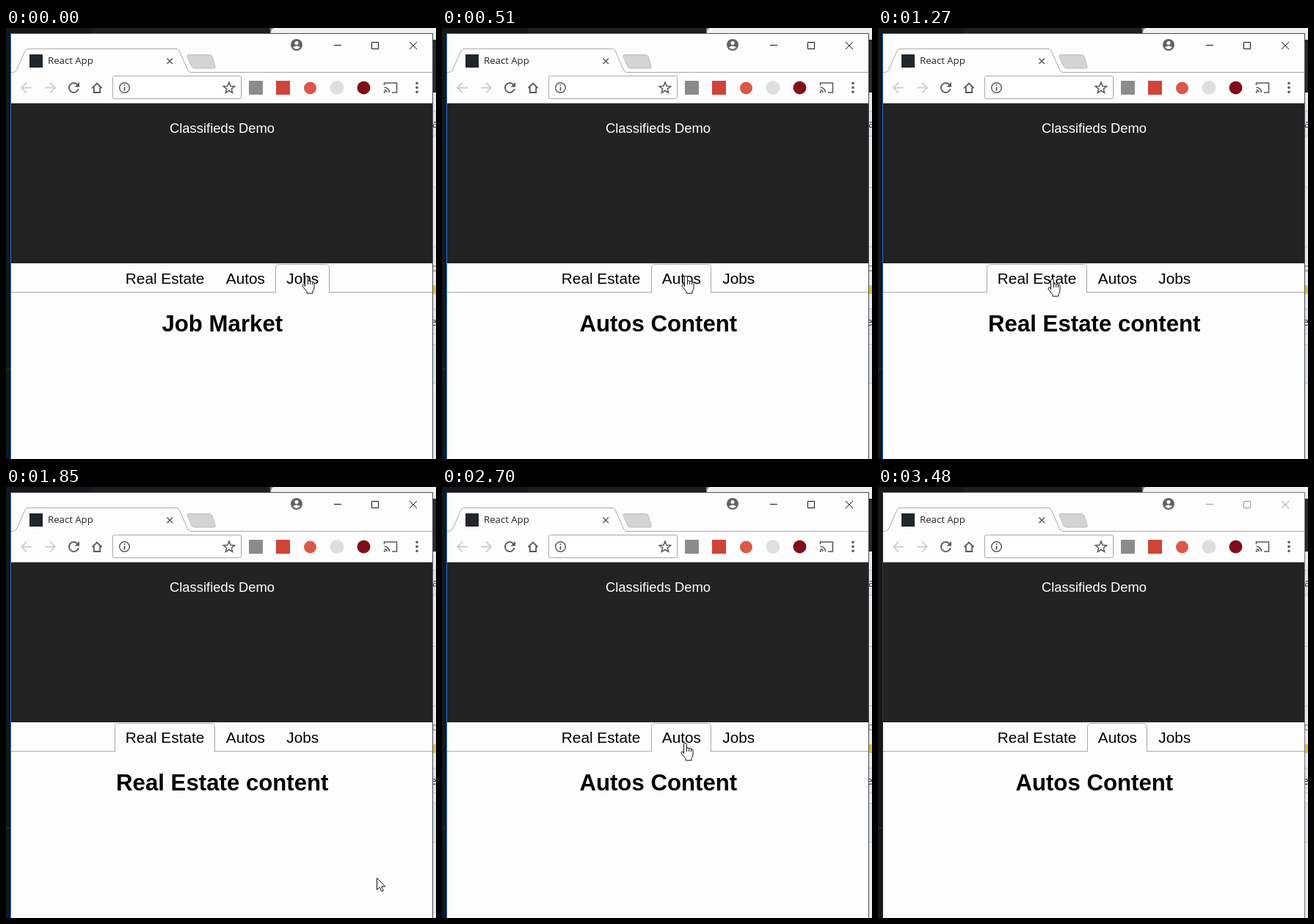
An HTML page for the animation above (3.5 s loop, 586x588 px).

```html
<!DOCTYPE html>
<html lang="en">
<head>
<meta charset="utf-8">
<title>Tabs demo</title>
<style>
  html, body { margin: 0; width: 100%; height: 100%; overflow: hidden; background: #fdfdfd; }
  svg { display: block; width: 586px; height: 588px; }
  .page { font-family: "Liberation Sans", Arial, sans-serif; }
  .chrome { font-family: "Open Sans", "Noto Sans", sans-serif; }
  .line { fill: none; stroke: #5a5a5a; stroke-width: 1.8; }
  .faint { stroke: #cecece; }
</style>
</head>
<body>
<svg viewBox="0 0 586 588">
  <!-- desktop behind the window -->
  <rect width="586" height="588" fill="#15171a"/>
  <rect x="117" width="250" height="8" fill="#1f1f1f"/>
  <path d="M360 8V0H586V8Z" fill="#f1f1f1"/>
  <path d="M360 0H365Q361 2 361 8H360Z" fill="#8a8a8a"/>
  <path d="M0 465.5H6" stroke="#30343a"/>
  <g>
    <rect x="581" y="8" width="5" height="580" fill="#e9e9e9"/>
    <rect x="581" y="16" width="5" height="72" fill="#292929"/>
    <rect x="581" y="114" width="5" height="33" fill="#dfe2ea"/>
    <rect x="581" y="351" width="5" height="12" fill="#e2c033"/>
    <rect x="581" y="384" width="5" height="33" fill="#dfe2ea"/>
    <rect x="581" y="431" width="5" height="53" fill="#d9e0e8"/>
    <path d="M581 113.5h5M581 147.5h5M581 217.5h5M581 298.5h5M581 383.5h5M581 417.5h5M581 431.5h5M581 484.5h5" stroke="#bcbcbc"/>
    <g class="chrome" font-size="14" fill="#333">
      <text x="581" y="136">a</text>
      <text x="580" y="332" fill="#b5513a">c</text>
      <text x="579" y="406">e</text>
    </g>
  </g>

  <!-- window -->
  <rect x="7" y="8" width="574" height="580" fill="#fdfdfd"/>
  <path id="edge" d="M6.5 588V8" stroke="#1670e0"/>
  <path id="rim" d="M6 7.5H582M581.5 8V588" fill="none" stroke="#4a5058"/>
  <path d="M7 60.5H10Q13 60 14.5 57L26 31Q27.500 28.500 30 28.500H232Q235 28.500 236 31L247.500 57Q249 60.500 252 60.500H581" fill="none" stroke="#a9a9a9"/>
  <path d="M249 36.500H277Q280 36.500 281 39L285 52Q286 55 283 55H257Q254 55 253 52.500L247 39Q246.500 36.500 249 36.500Z" fill="#d4d4d4" stroke="#bdbdbd"/>
  <rect x="32" y="36" width="18" height="18" fill="#20262b"/>
  <g class="chrome">
    <text x="57" y="49.300" font-size="13.200" fill="#222">React App</text>
    <text x="176" y="87" font-size="15.100" fill="#222">localhost<tspan fill="#7c7c7c">:3000</tspan></text>
  </g>
  <path d="M219.500 41.500l7.500 7.500m0-7.500l-7.500 7.500" class="line" style="stroke-width:1.500"/>
  <circle cx="396" cy="23" r="8" fill="#636363"/>
  <circle cx="396" cy="20.500" r="2.500" fill="#fff"/>
  <path d="M391 26.500Q396 22.500 401 26.500Q396 31 391 26.500Z" fill="#fff"/>
  <path id="controls" d="M447 23.500H457M498.500 19.500H507.500V28.500H498.500ZM550 19L560 29M560 19L550 29" fill="none" stroke="#111"/>

  <!-- toolbar -->
  <path d="M35 81.500H21M28 74.500L21 81.500L28 88.500M53 81.500H67M60 74.500L67 81.500L60 88.500" class="line faint"/>
  <path d="M97.500 77.500A6.500 6.500 0 1 0 98.700 83" class="line"/>
  <path d="M100 74V80.500H93.500Z" fill="#5a5a5a"/>
  <path d="M117.500 82L124 75.500L130.500 82M119.800 80.500V88H128.200V80.500" class="line"/>
  <rect x="145.500" y="65.500" width="175" height="31" rx="2" fill="#fff" stroke="#a8a8a8"/>
  <circle cx="161.500" cy="81.500" r="6.800" class="line" style="stroke-width:1.500"/>
  <path d="M161.500 77.300V79M161.500 80.500V85.500" class="line"/>
  <path id="star" class="line" style="stroke-width:1.500"/>
  <rect x="331" y="72" width="19" height="19" rx="1" fill="#8b8b8b"/>
  <rect x="368" y="72" width="19" height="19" fill="#cf4439"/>
  <circle cx="414.500" cy="82" r="8.500" fill="#d9584a"/>
  <circle cx="451" cy="81.500" r="9.500" fill="#dedede"/>
  <circle cx="487.500" cy="81.500" r="9" fill="#800f19"/>
  <path d="M515.500 78V75H532.500V88H526M515.500 81Q522 81.500 522.500 88M515.500 84.500Q519 85 519 88" class="line" style="stroke-width:1.600"/>
  <g fill="#5a5a5a">
    <circle cx="515.900" cy="87.500" r="1.200"/>
    <circle cx="560" cy="75.300" r="1.800"/><circle cx="560" cy="81.300" r="1.800"/><circle cx="560" cy="87.300" r="1.800"/>
  </g>
  <path d="M7 102.500H581" stroke="#b5b5b5"/>

  <!-- page -->
  <rect x="7" y="103" width="574" height="218" fill="#222"/>
  <g class="page">
    <text x="294.500" y="143" font-size="18.400" fill="#fff" text-anchor="middle">Classifieds Demo</text>
    <path d="M7 360.500H581" stroke="#aaa"/>
    <path id="tab" fill="#fdfdfd" stroke="#aaa"/>
    <g font-size="20.800" fill="#000">
      <text x="162.800" y="349">Real Estate</text>
      <text x="299.800" y="349">Autos</text>
      <text x="382.300" y="349">Jobs</text>
    </g>
    <text id="heading" x="294.800" y="414" font-size="31.200" font-weight="bold" text-anchor="middle"></text>
  </g>

  <g id="cursor" fill="#fff" stroke="#111" stroke-linejoin="round">
    <g id="hand" transform="translate(-6 0)">
      <path d="M4.500 15V2.500a2 2 0 0 1 4 0V8q0-1.300 1.600-1.300q1.700 0 1.700 1.800q.2-1.200 1.600-1q1.300.2 1.300 1.700q.4-.9 1.300-.6q1 .3 1 1.800V16q0 3-2 5V24H7V21.500L2 15.500Q.4 13.300 1.600 12.200q1.300-1 2.900 1.300Z"/>
      <path d="M8.500 8V12M11.700 8.500V12M14.600 9V12" fill="none"/>
    </g>
    <path id="arrow" d="M.5.500V16.500L4.200 13L6.800 18.800L9.200 17.700L6.700 12H11.700Z"/>
  </g>
</svg>
<script>
const LOOP = 3500;
const $ = id => document.getElementById(id);
const el = {};
for (const id of ["tab", "heading", "cursor", "hand", "arrow", "edge", "rim", "controls"]) el[id] = $(id);

const tabs = {
  estate: { left: 148.5, right: 284.5, title: "Real Estate content" },
  autos: { left: 285.5, right: 366.5, title: "Autos Content" },
  jobs: { left: 367.5, right: 440.5, title: "Job Market" }
};
const clicks = [[0, "jobs"], [510, "autos"], [1270, "estate"], [2700, "autos"]];

const linear = p => p;
const easeOut = p => 1 - (1 - p) ** 2;
const easeInOut = p => p < 0.5 ? 4 * p ** 3 : 1 - 4 * (1 - p) ** 3;

// Pointer moves: start, end, target x, target y, easing
const startPos = [409, 338];
const moves = [
  [40, 320, 332, 338, easeInOut],
  [510, 930, 237, 342, easeInOut],
  [1440, 1920, 508, 535, easeInOut],
  [2000, 2490, 331, 348.5, easeOut],
  [2700, 3000, 471, 521.5, linear],
  [3000, 3200, 543, 592, linear]
];

function pointerAt(t) {
  let [x, y] = startPos;
  for (const [from, to, tx, ty, ease] of moves) {
    if (t < from) break;
    const p = ease(Math.min(1, (t - from) / (to - from)));
    x += (tx - x) * p;
    y += (ty - y) * p;
  }
  return [Math.round(x), Math.round(y)];
}

function starPath(cx, cy, outer, inner) {
  const points = Array.from({ length: 10 }, (_, i) => {
    const r = i % 2 ? inner : outer, a = Math.PI * (i / 5 - 0.5);
    return `${cx + r * Math.cos(a)} ${cy + r * Math.sin(a)}`;
  });
  return `M${points.join("L")}Z`;
}

function draw(t) {
  const name = clicks.filter(([at]) => at <= t).pop()[1];
  const { left, right, title } = tabs[name];
  el.tab.setAttribute("d", `M${left} 361.5V327.500q0-5 5-5H${right - 5}q5 0 5 5V361.500`);
  el.heading.textContent = title;

  const [x, y] = pointerAt(t);
  const overTab = y < 361 && x > 148 && x < 441;
  el.cursor.setAttribute("transform", `translate(${x} ${y})`);
  el.cursor.style.display = t < 3200 ? "" : "none";
  el.hand.style.display = overTab ? "" : "none";
  el.arrow.style.display = overTab ? "none" : "";

  const focused = t < 3480;
  el.edge.setAttribute("stroke", focused ? "#1670e0" : "#3a3a3a");
  el.rim.setAttribute("stroke", focused ? "#4a5058" : "#777");
  el.controls.setAttribute("stroke", focused ? "#111" : "#999");
}

function tick() {
  draw(performance.now() % LOOP);
  requestAnimationFrame(tick);
}

$("star").setAttribute("d", starPath(304, 82, 8, 3.5));
tick();
</script>
</body>
</html>
```
